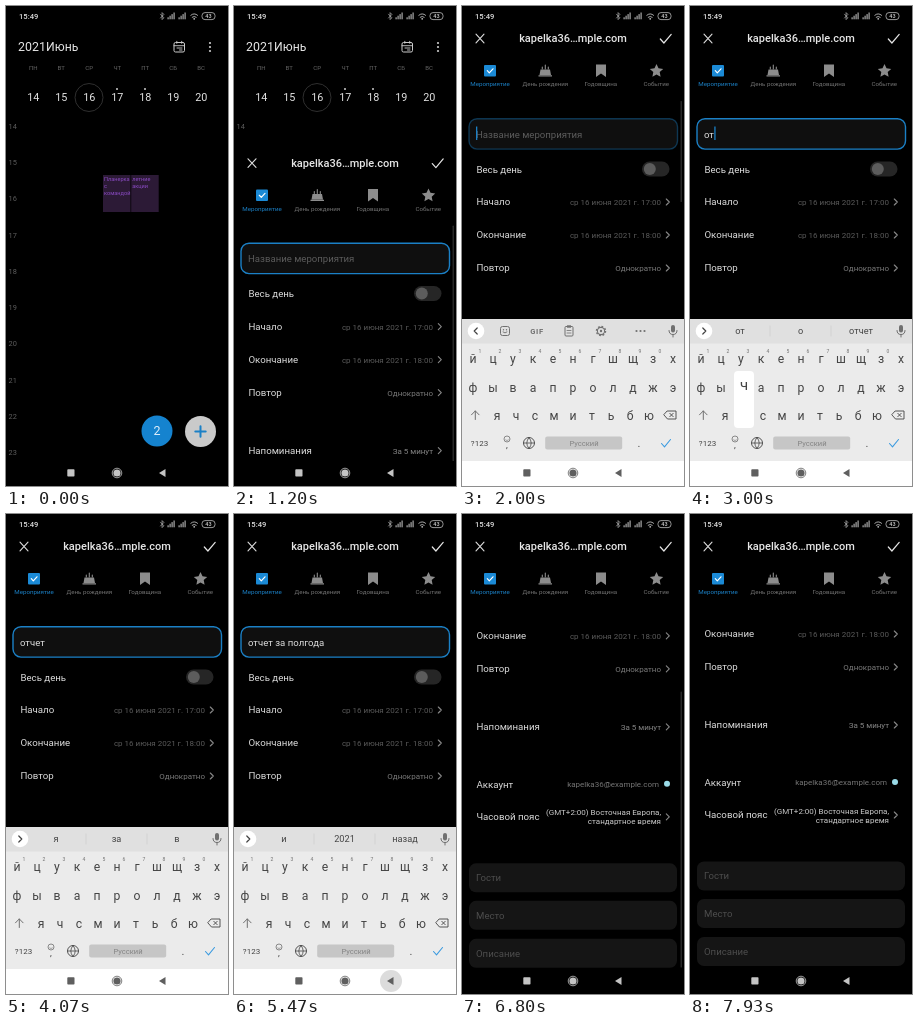
These frames come from a looping animation (222x480 px, 8000 ms). An HTML page:

```html
<!DOCTYPE html>
<html lang="ru">
<head>
<meta charset="utf-8">
<title>Новое мероприятие</title>
<style>
html, body { margin: 0; width: 100%; height: 100%; overflow: hidden; background: #000; }
svg { display: block; width: 222px; height: 480px; }
text { font-family: Roboto, "Noto Sans", sans-serif; white-space: pre; }
.line { fill: none; stroke-linecap: round; stroke-linejoin: round; }
</style>
</head>
<body>
<svg id="stage" viewBox="0 0 222 480" xmlns="http://www.w3.org/2000/svg"></svg>
<script>
const STEP = 200 / 3, LOOP = 8000;
const BLUE = '#1b80c6';

// y is the middle of the capitals
const text = (x, y, s, size, fill, anchor = 'start', extra = '') =>
  `<text x="${x}" y="${y + size * 0.355}" font-size="${size}" fill="${fill}" text-anchor="${anchor}" ${extra}>${s}</text>`;
const mid = (x, y, s, size, fill, extra) => text(x, y, s, size, fill, 'middle', extra);
const rect = (x, y, w, h, fill, r = 0, extra = '') =>
  `<rect x="${x}" y="${y}" width="${w}" height="${h}" rx="${r}" fill="${fill}" ${extra}/>`;
const dot = (x, y, r, fill, extra = '') => `<circle cx="${x}" cy="${y}" r="${r}" fill="${fill}" ${extra}/>`;
const line = (d, stroke, w = 1) => `<path class="line" d="${d}" stroke="${stroke}" stroke-width="${w}"/>`;
const shape = (d, fill) => `<path d="${d}" fill="${fill}"/>`;
const group = (id, body, extra = '') => `<g id="${id}" ${extra}>${body}</g>`;

function statusBar() {
  const bars = x => [0, 1, 2, 3].map(i => rect(x + i * 2, 11.3 - i * 1.6, 1.2, 2 + i * 1.6, '#aaa')).join('');
  return text(13, 10, '15:49', 7.6, '#ddd', 'start', 'font-weight="500"')
    + line('M154.5 8.2l3.4 3.6-1.8 1.8v-7l1.8 1.8-3.4 3.6', '#bbb', 0.7)
    + bars(161.5) + bars(172.5)
    + line('M184.800 9.300q3.400-3 6.800 0M186.200 11.200q2-1.600 4 0', '#bbb', 0.9) + dot(188.2, 12.8, 0.9, '#bbb')
    + rect(196, 6.6, 13, 7, 'none', 3, 'stroke="#bbb" stroke-width=".8"')
    + mid(202.5, 10.1, '43', 5.5, '#ccc', 'font-weight="500"');
}

function calendar() {
  let out = text(12, 41, '2021', 12.4, '#e6e6e6') + text(40, 41, 'Июнь', 12.2, '#e6e6e6');
  out += rect(168, 36.5, 10.5, 9.5, 'none', 1.5, 'stroke="#ccc"')
    + line('M168 39.7h10.5M170.8 35.3v2M175.7 35.3v2M171 42h5M173.5 44h2.5', '#ccc', 0.9);
  for (const y of [37, 41, 45]) out += dot(204, y, 1.1, '#ccc');
  ['ПН', 'ВТ', 'СР', 'ЧТ', 'ПТ', 'СБ', 'ВС'].forEach((day, i) => {
    const x = 27.2 + i * 28;
    out += mid(x, 62, day, 6, '#666') + mid(x, 91.2, 14 + i, 10.8, '#e2e2e2');
  });
  out += dot(83, 91.5, 14, 'none', 'stroke="#3c3c3c" stroke-width=".8"')
    + dot(111, 83, 1, '#ccc') + dot(139, 83, 1, '#ccc');
  for (let i = 0; i < 10; i++) out += text(2.5, 120 + i * 36.3, 14 + i, 7.4, '#5c5c5c');
  const event = (x, words) => rect(x, 169, 27.5, 37, '#2c1a36')
    + words.map((w, i) => text(x + 1, 173.2 + i * 6.8, w, 5.6, '#8b4bc4')).join('');
  out += event(97, ['Планерка', 'с', 'командой']) + event(125.2, ['летние', 'акции']);
  out += dot(151, 425, 15.5, '#1583cf') + mid(151, 425, '2', 12.5, '#e0eefa')
    + dot(194.5, 425.5, 15.5, '#cacaca') + line('M194.5 420.3v10.4M189.3 425.5h10.4', BLUE, 2);
  return out;
}

function tabs() {
  const names = ['Мероприятие', 'День рождения', 'Годовщина', 'Событие'];
  const gray = '#8c8c8c';
  return rect(22, 59, 12, 11.5, '#1b8ad6', 1) + line('M25.3 64.7l2 2.1 3.7-4', '#fff', 1.2)
    + shape('M78.500 63.500h9.500l1 5.500H77.500zM76.500 69.200h13.500v1.300h-13.500z', gray)
    + line('M80.300 61v2M83.300 59v4M86.300 61v2', gray, 1.1)
    + shape('M134 58.500h10v12.500l-5-3.600-5 3.600z', gray)
    + shape('M194.500 58l2 4.300 4.700.6-3.500 3.200.9 4.700-4.100-2.300-4.100 2.300.9-4.700-3.500-3.200 4.700-.6z', gray)
    + names.map((n, i) => mid(28 + i * 55.4, 78, n, 6.2, i ? '#747474' : BLUE)).join('');
}

function form() {
  const row = (y, label, value, color) => text(14.4, y, label, 9.7, '#dcdcdc')
    + (value ? text(199, y + 0.3, value, 8, color, 'end') + line(`M204.300 ${y - 3}l3 3-3 3`, '#888', 1.1) : '');
  const box = (y, label) => rect(7, y - 14.5, 208, 29, '#151515', 7) + text(14, y, label, 9.6, '#4d4d4d');
  return rect(7, 112.7, 208.5, 30.4, '#0f0f0f', 8, `id="frame" stroke="${BLUE}" stroke-width="1.4"`)
    + text(14, 128.2, '', 9.6, '#ddd', 'start', 'id="title"')
    + rect(14, 120.5, 1.3, 13.5, BLUE, 0, 'id="caret"')
    + row(163.2, 'Весь день')
    + rect(180, 155.5, 27.5, 15, '#262626', 7.5) + dot(187.8, 163, 6, '#5c5c5c')
    + row(196, 'Начало', 'ср 16 июня 2021 г. 17:00', '#5a5a5a')
    + row(229, 'Окончание', 'ср 16 июня 2021 г. 18:00', '#5a5a5a')
    + row(262, 'Повтор', 'Однократно', '#7a7a7a')
    + row(320, 'Напоминания', 'За 5 минут', '#868686')
    + row(377.5, 'Аккаунт') + text(197, 377.5, 'kapelka36@example.com', 8, '#747474', 'end') + dot(205, 377, 3, '#9adbe8')
    + row(410, 'Часовой пояс', ' ', '#ccc')
    + text(199, 405.8, '(GMT+2:00) Восточная Европа,', 8, '#ccc', 'end')
    + text(199, 414.8, 'стандартное время', 8, '#ccc', 'end')
    + box(471, 'Гости') + box(508.5, 'Место') + box(546.5, 'Описание');
}

const sheet = () => rect(0, 14, 222, 470, '#000')
  + line('M14 28.200l8 8.600M22 28.200l-8 8.600', '#ddd', 1.1)
  + mid(111, 32.5, 'kapelka36…mple.com', 11, '#e6e6e6', 'font-weight="500"')
  + line('M198.300 33l3.600 4 7.300-8.600', '#e6e6e6', 1.2)
  + tabs()
  + `<g clip-path="url(#view)">${group('form', form())}</g>`
  + rect(218.6, 95, 1.2, 276, '#333', 0.6, 'id="thumb"');

const INK = '#444', SOFT = '#707070';
const keyRows = [['йцукенгшщзх', 11, 20, 352], ['фывапролджэ', 11, 20, 381], ['ячсмитьбю', 35, 19, 409]];

function keyPos(ch) {
  for (const [keys, x, dx, y] of keyRows) {
    const i = keys.indexOf(ch);
    if (i >= 0) return [x + i * dx, y];
  }
}

function keyboard() {
  let out = rect(0, 313, 222, 170, '#ebebeb') + rect(0, 313, 222, 24.5, '#e0e0e0');
  out += dot(14, 325, 8.3, '#fff') + line('', INK, 1.2).replace('<path', '<path id="arrow"');
  const tools = rect(38.5, 320.5, 9, 9, 'none', 2, `stroke="${SOFT}"`)
    + dot(41.5, 323.7, 0.7, SOFT) + dot(44.5, 323.7, 0.7, SOFT) + line('M41 326q2 2 4 0', SOFT, 0.9)
    + mid(75, 325, 'GIF', 7.6, SOFT, 'font-weight="700" letter-spacing=".6"')
    + rect(103, 320.5, 8, 9.5, 'none', 1, `stroke="${SOFT}"`) + rect(105, 319.3, 4, 2.4, SOFT)
    + line('M105 324.500h4M105 327h4', SOFT, 0.8)
    + dot(139, 325, 3.6, 'none', `stroke="${SOFT}" stroke-width="1.1"`) + dot(139, 325, 1.2, SOFT)
    + dot(139, 325, 4.6, 'none', `stroke="${SOFT}" stroke-width="1.3" stroke-dasharray="1.8 1.8"`)
    + [174.5, 178.5, 182.5].map(x => dot(x, 325, 1.1, SOFT)).join('');
  out += group('tools', tools);
  out += group('words', line('M80 320v10M141 320v10', '#ccc', 0.7)
    + [50, 110.5, 171].map(x => mid(x, 325, '', 9.2, INK)).join(''));
  out += rect(209, 319, 4, 7.5, SOFT, 2) + line('M207 324.500q0 4 4 4t4-4M211 328.500v2.500', SOFT, 1);
  for (const [keys, x, dx, y] of keyRows)
    [...keys].forEach((k, i) => out += mid(x + i * dx, y + 1, k, 12.2, INK));
  [...'1234567890'].forEach((d, i) => out += mid(18 + i * 20, 345, d, 5, SOFT));
  out += line('M13.300 413.500v-8.500M9.500 408.800l3.800-3.900 3.800 3.900', SOFT, 1)
    + line('M205.500 405h8.500v8h-8.500l-3.500-4zM207.800 407.300l3.400 3.400M211.200 407.300l-3.400 3.400', INK, 0.9)
    + mid(17.5, 437, '?123', 8, INK)
    + dot(45, 433, 3, 'none', `stroke="${SOFT}" stroke-width=".8"`) + line('M43.600 434q1.400 1.300 2.800 0', SOFT, 0.6)
    + mid(45, 438.5, ',', 9, INK)
    + dot(67, 437, 5.5, 'none', `stroke="${INK}" stroke-width=".9"`)
    + line('M61.500 437h11M67 431.500q-4.500 5.500 0 11q4.500-5.500 0-11', INK, 0.8)
    + rect(83.2, 430.5, 77, 13, '#c6c6c6', 2) + mid(122, 437, 'Русский', 7.6, '#858585')
    + mid(177, 437, '.', 11, INK) + line('M199.500 437.500l3 3.300 6-7.300', '#3c9be0', 1.1);
  out += group('pop', rect(-10, -44, 20, 57, '#fff', 4) + mid(0, -30, '', 15, INK));
  return out;
}

const navBar = () => rect(0, 455, 222, 25, '#000', 0, 'id="navBack"')
  + dot(157, 467, 11, '#9a9a9a', 'id="press" opacity=".35"')
  + group('nav', rect(61.3, 463.3, 7.2, 7.2, 'currentColor', 0.8)
    + dot(111, 467, 3.6, 'currentColor') + dot(111, 467, 4.8, 'none', 'stroke="currentColor" stroke-width=".8"')
    + shape('M153 467l6.500-4v8z', 'currentColor'));

const stage = document.getElementById('stage');
stage.innerHTML = '<defs><clipPath id="view"><rect y="95" width="222" height="365"/></clipPath></defs>'
  + calendar() + group('sheet', sheet()) + group('keyboard', keyboard()) + navBar() + statusBar();

const el = id => document.getElementById(id);
const show = (id, on) => { el(id).style.display = on ? '' : 'none'; };
const move = (id, x, y) => el(id).setAttribute('transform', `translate(${x} ${y})`);
const clamp = v => Math.max(0, Math.min(1, v));
const latest = (list, t) => list.filter(e => t >= e[0]).pop();

const typed = [[0, ''], [1930, ''], [2530, 'о'], [2800, 'от'], [3065, 'отч'], [3530, 'отчет'],
  [4130, 'отчет за'], [4665, 'отчет за полгода']];
const hints = [[0, ''], [2600, 'он о от'], [2865, 'от о отчет'], [3065, 'отчет отч отчеты'],
  [3665, 'я за в'], [4200, 'месяц полгода последние'], [4665, 'и 2021 назад']];
const presses = [[2465, 'о'], [2730, 'т'], [3000, 'ч']];

function draw(t) {
  show('sheet', t >= 1130);
  move('sheet', 0, t < 1700 ? 449 * Math.exp(-(t - 1071) / 101) : 0);

  const rise = 1 - (1 - clamp((t - 1500) / 430)) ** 2;
  const drop = t < 5660 ? 0 : t < 5730 ? 0.35 : t < 5795 ? 0.75 : 1;
  const keys = t >= 1530 && drop < 1;
  show('keyboard', keys);
  move('keyboard', 0, 142 * (1 - rise + drop));
  el('navBack').setAttribute('fill', keys ? '#fff' : '#000');
  el('nav').setAttribute('color', keys ? '#5f5f5f' : '#c4c4c4');
  show('press', t >= 5460 && t < 5660);

  // the outline dims when the field takes focus, then brightens again
  const glow = t < 1930 ? 1 : 0.4 + 0.6 * clamp((t - 2000) / 330);
  el('frame').setAttribute('stroke-opacity', glow);

  const [since, value] = latest(typed, t);
  const title = el('title');
  title.textContent = value || 'Название мероприятия';
  title.setAttribute('fill', value ? '#ddd' : '#5c5c5c');
  show('caret', t >= 1930 && Math.floor((t - since) / 500) % 2 === 0);
  el('caret').setAttribute('x', value ? 14.3 + title.getComputedTextLength() : 14);

  const words = latest(hints, t)[1];
  show('tools', !words);
  show('words', words);
  el('arrow').setAttribute('d', words ? 'M12.800 322l3 3-3 3' : 'M15.200 322l-3 3 3 3');
  const list = words.split(' ');
  el('words').querySelectorAll('text').forEach((n, i) => { n.textContent = list[i] || ''; });

  const press = presses.find(([at]) => t >= at && t < at + 130);
  show('pop', press);
  if (press) {
    move('pop', ...keyPos(press[1]));
    el('pop').querySelector('text').textContent = press[1];
  }

  const scroll = 109 * (1 - (1 - clamp((t - 6333) / 600)) ** 2.7);
  move('form', 0, -scroll);
  const thumb = el('thumb'), size = keys ? 101 : 276;
  thumb.setAttribute('height', size);
  thumb.setAttribute('y', 95 + scroll * 0.77);
  thumb.setAttribute('opacity', t < 3000 ? clamp((2330 - t) / 330) : t < 6390 ? 0 : clamp((7530 - t) / 260));
}

const start = performance.now();
function tick() {
  const t = (performance.now() - start) % LOOP;
  draw(Math.floor((t + 4) / STEP) * STEP + 0.5);
  requestAnimationFrame(tick);
}
tick();
</script>
</body>
</html>
```
